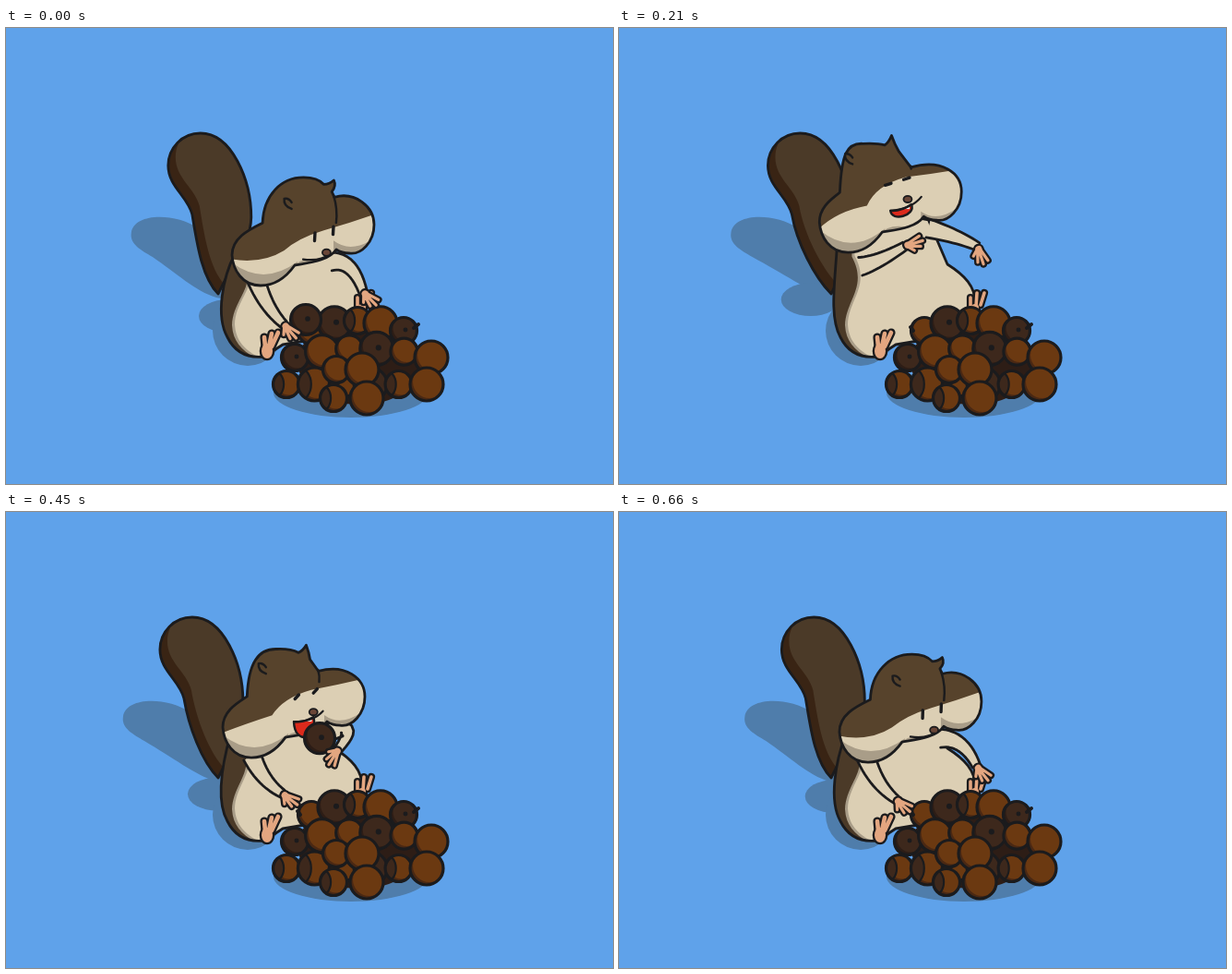
Write an HTML page with a canvas that moves like this. It is 658x494 px and loops after 0.69 s.

```html
<!DOCTYPE html>
<html lang="en">
<head>
<meta charset="utf-8">
<title>Hungry squirrel</title>
<style>
html, body { margin: 0; width: 100%; height: 100%; overflow: hidden; background: #5fa2ea; }
canvas { display: block; }
</style>
</head>
<body>
<canvas id="stage" width="658" height="494"></canvas>
<script>
const g = document.getElementById('stage').getContext('2d');
const LOOP = 690, STEP = 30;
const SKY = '#5fa2ea', SHADOW = '#4f7dab', INK = '#1b1b1d', FUR = '#4b3a28', FUR_DARK = '#392414',
  HEAD_FUR = '#57432c', CREAM = '#dccfb4', CREAM_DARK = '#a99d88', SKIN = '#e3a680', RED = '#dc2a1c',
  NUT = '#6b3911', NUT_DARK = '#4a2813', CAP = '#3d281c', CAP_DARK = '#2d1d16';

// each bite: bend down, throw the head back, bend down again
const BITES = [
  { from: 0, top: 190, to: 380, pick: [325, 316], eat: [316, 216] },
  { from: 380, top: 537, to: LOOP, pick: [380, 298], eat: [318, 216] }
];

// rows of the pile: y, first x, last x, drop at the ends, kinds (nut, cap, side)
const ROWS = [
  [317, 331, 431, 11, 'ncsnc'], [347, 313, 461, 10, 'cnncnn'], [386, 304, 456, 0, 'ssncsn'],
  [370, 358, 386, 0, 'nn'], [401, 355, 391, 0, 'sn']
];

const mix = (a, b, k) => a + (b - a) * k;
const rad = a => a * Math.PI / 180;

function biteAt(time) {
  const t = time % LOOP, bite = BITES[t < BITES[0].to ? 0 : 1], { from, top, to } = bite;
  const up = (t - from) / (top - from), down = (t - top) / (to - top);
  return t < top
    ? { bite, up, lean: up ** 1.4, reach: Math.sin(up * Math.PI / 2), open: Math.min(1, up * 1.25) }
    : { bite, up: 1, lean: 1 - down, reach: Math.max(0, 1 - 2 * down), open: .3 * (1 - down) };
}

function ball(x, y, rx, ry = rx) {
  const path = new Path2D();
  path.ellipse(x, y, rx, ry, 0, 0, 7);
  return path;
}

function poly(points) {
  const path = new Path2D();
  points.forEach(p => path.lineTo(...p));
  return path;
}

function fill(path, color) {
  g.fillStyle = color;
  g.fill(path);
}

function ink(path, width = 2.8, color = INK) {
  g.lineWidth = width;
  g.strokeStyle = color;
  g.stroke(path);
}

function inside(path, draw) {
  g.save();
  g.clip(path);
  draw();
  g.restore();
}

function acorn(x, y, r, kind) {
  const rim = ball(x, y, r), cap = kind === 'c';
  fill(rim, cap ? CAP_DARK : NUT_DARK);
  inside(rim, () => {
    fill(ball(x + 3, y - 3, r), cap ? CAP : NUT);
    if (kind !== 's') return;
    const shell = ball(x - r * .95, y, r * .75, r);
    fill(shell, CAP);
    ink(shell, 2.2);
  });
  ink(rim, 3.2);
  if (cap) fill(ball(x + 2, y - 1, r * .17), INK);
}

function drawPile() {
  fill(ball(384, 362, 68, 46), CAP_DARK);
  for (const [y, x0, x1, drop, kinds] of ROWS) {
    [...kinds].forEach((kind, i) => {
      const u = i / (kinds.length - 1);
      acorn(mix(x0, x1, u), y + drop * (2 * u - 1) ** 2, i % 2 ? 18 : 14.5, kind);
    });
  }
  ink(new Path2D('M442 325L447 321M316 324L319 328'), 4);
}

// strokes with a shared outline, closed off by a round pad
function paw(strokes, width, pad) {
  const path = new Path2D(strokes);
  ink(path, width + 4.6);
  ink(pad, 4.6);
  fill(pad, SKIN);
  ink(path, width, SKIN);
}

function hand(x, y, angle) {
  g.save();
  g.translate(x, y);
  g.rotate(rad(angle));
  paw('M2 -1L18 -5M2 0L20 1M2 1L16 6M2 1L8 8', 3.2, ball(3, 0, 3.6));
  g.restore();
}

function limb(a, b, c) {
  const one = [], two = [];
  for (let i = 0; i <= 12; i++) {
    const u = i / 12, v = 1 - u, w = mix(10, 4.5, u);
    const pos = k => v * v * a[k] + 2 * u * v * b[k] + u * u * c[k];
    const dir = k => v * (b[k] - a[k]) + u * (c[k] - b[k]);
    const len = Math.hypot(dir(0), dir(1)), nx = -dir(1) / len * w, ny = dir(0) / len * w;
    one.push([pos(0) + nx, pos(1) + ny]);
    two.unshift([pos(0) - nx, pos(1) - ny]);
  }
  fill(poly([...one, ...two]), CREAM);
  ink(poly(one));
  ink(poly(two));
}

function drawShadows(hx, hy, s) {
  fill(new Path2D(`M${137 + s} 222C${140 + s} 200 ${184 + s} 200 ${210 + s} 217C${232 + s / 2} 235 245 260 245 295
    L228 292C205 285 ${186 + s / 2} 266 ${160 + s} 248C${148 + s} 241 ${135 + s} 234 ${137 + s} 222Z`), SHADOW);
  fill(ball(241 + hx * 1.2, 312 + hy * .5, 32, 18), SHADOW);
  fill(ball(262, 328, 38, 38), SHADOW);
  fill(ball(374, 395, 84, 27), SHADOW);
}

function drawTail(s) {
  const path = new Path2D(`M230 288C212 270 ${208 + s} 232 ${203 + s} 202C${198 + s} 182 ${177 + s} 172 ${177 + s} 149
    C${177 + s} 130 ${192 + s} 114 ${212 + s} 114C${246 + s} 114 ${267 + s} 165 ${267 + s} 205
    C${266 + s / 2} 225 255 245 243 262Z`);
  fill(path, FUR_DARK);
  inside(path, () => {
    g.translate(8, -9);
    fill(path, FUR);
  });
  ink(path);
}

function drawBody(hx, hy) {
  const x = 248 + hx * .4, y = 245 + hy * .5;
  const path = new Path2D(`M${x} ${y}C235 270 227 312 240 335C248 351 262 358 280 356L300 343L330 338
    L380 322L386 297C386 280 375 268 356 256L${352 + hx * .6} ${240 + hy * .9}L${290 + hx} ${230 + hy}Z`);
  fill(path, FUR);
  inside(path, () => {
    const bx = 258 + hx * .2, by = 262 + hy * .4;
    const belly = new Path2D(`M${bx} ${by}C270 280 246 295 245 322C246 340 256 350 272 358L400 360V180H${bx}Z`);
    fill(belly, CREAM_DARK);
    g.translate(3, -1);
    fill(belly, CREAM);
  });
  ink(path);
  paw('M381 303L381 292M387 302L388 287M392 300L396 287', 3.6, ball(386, 303, 4));
  paw('M281 345L280 335M285 345L288 331M288 345L295 330', 4.6, ball(283, 350, 6, 8));
}

function drawMouth(q, open) {
  const l = [322, 252 - 20 * q], r = [350 + 6 * q, 247 - 31 * q];
  const p = [mix(l[0], r[0], .68), mix(l[1], r[1], .45)], depth = open * 46;
  if (open > .07) {
    const gap = new Path2D(`M${l}Q${mix(l[0], p[0], .5)} ${l[1] + 1} ${p}
      C${p[0] + 5} ${p[1] + depth} ${l[0] + 1} ${l[1] + depth} ${l}Z`);
    fill(gap, RED);
    inside(gap, () => {
      g.fillStyle = '#f4f1ea';
      g.fillRect(p[0] - 8, p[1] - 3, 6, 8);
    });
    ink(gap, 2.4);
  }
  ink(new Path2D(`M${l}Q${p[0]} ${p[1] + 5} ${r}`), 2.2);
}

// the cheeks keep their shape; skull, fur edge and face shift with the nod q
function drawHead(hx, hy, q, open) {
  const at = (x, y, dx, dy) => [x + dx * q, y + dy * q];
  g.save();
  g.translate(hx, hy);
  const path = new Path2D(`M${at(279, 211, -13, 3)}
    C${at(280, 182, -12, -10)} ${at(300, 162, -28, -2)} ${at(325, 162, -36, -1)}
    Q${at(340, 162, -36, -2)} ${at(347, 170, -34, -8)} Q${at(353, 170, -36, -11)} ${at(358, 166, -38, -15)}
    Q${at(361, 172, -38, -12)} ${at(355, 178, -26, -9)} L${at(357, 183, -14, 4)}
    C378 177 399 193 399 213C399 232 385 246 372 244Q364 244 358 240C350 252 330 254 313 257
    C303 271 290 279 276 279C256 279 246 262 245 246C245 228 262 219 ${at(279, 211, -13, 3)}Z`);
  fill(path, CREAM);
  inside(path, () => {
    fill(new Path2D(`M242 252Q278 ${281 + 4 * q} 316 253V290H240Z`), CREAM_DARK);
    fill(new Path2D(`M355 ${230 + 5 * q}Q372 ${243 + 4 * q} 394 231V252H355Z`), CREAM_DARK);
    fill(new Path2D('M310 260Q320 247 342 252V270H310Z'), CREAM_DARK);
    fill(new Path2D(`M${at(243, 250, 1, 4)}Q${at(278, 258, -15, -26)} ${at(302, 242, -6, -15)}
      Q${at(318, 229, -13, -25)} ${at(345, 221, -7, -26)}Q${at(375, 212, -8, -20)} ${at(402, 202, -8, -14)}
      L430 100H200V254Z`), HEAD_FUR);
  });
  ink(path);

  const [ex, ey] = at(308, 191, -34, -15);
  const ear = new Path2D(`M${ex + 4} ${ey + 6}Q${ex - 5} ${ey + 3} ${ex - 4} ${ey - 5}Q${ex + 1} ${ey - 6} ${ex + 4} ${ey - 1}`);
  fill(ear, HEAD_FUR);
  ink(ear, 2.4);
  const fold = Math.max(0, 1 - q);
  ink(new Path2D(`M${at(356, 181, -13, 5)}q${5 * fold} ${16 * fold} ${3 * fold} ${32 * fold}`), 2.4);

  const tall = 4.5 * fold, flat = 3.5 * q;
  for (const [x, y] of [at(336, 228, -18, -25), at(356, 221, -18, -24)]) {
    ink(new Path2D(`M${x - flat} ${y + tall + flat * .2}L${x + flat} ${y - tall - flat * .2}`), 3.4);
  }
  drawMouth(q, open);
  const nose = ball(...at(348, 245, -8, -26), 4.5, 3.6);
  fill(nose, '#6a4637');
  ink(nose, 1.8);
  g.restore();
}

function draw(t) {
  const { bite, up, lean, reach, open } = biteAt(t);
  const nod = 1.2 * biteAt(t + 25).lean, sway = -17 * nod;
  const hx = -31 * lean, hy = -40 * lean;
  const grabL = bite === BITES[0] ? reach : 0, grabR = reach - grabL;
  const left = [301 - 4 * lean + 16 * grabL, 321 - 49 * lean - 52 * grabL];
  const right = [387 + 2 * lean - 42 * grabR, 286 - 55 * lean - 18 * grabR];
  const elbow = [376 - 11 * lean + 20 * grabR, 250 - 28 * lean - 26 * grabR];
  const shoulderL = [270 + hx * .3, 269 + hy * .3], shoulderR = [352 + hx * .6, 253 + hy];

  g.lineCap = g.lineJoin = 'round';
  g.fillStyle = SKY;
  g.fillRect(0, 0, 658, 494);
  drawShadows(hx, hy, sway);
  drawTail(sway);
  drawBody(hx, hy);
  drawPile();
  limb(shoulderL, [mix(shoulderL[0], left[0], .5) - 5, mix(shoulderL[1], left[1], .5) + 7], left);
  limb(shoulderR, elbow, right);
  drawHead(hx, hy, nod, open);
  if (up < .93) {
    const [x, y] = bite.pick.map((v, i) => mix(v, bite.eat[i], reach));
    acorn(x, y, 16.5, 'c');
  }
  hand(...left, 45 - 35 * lean - 42 * grabL);
  hand(...right, 42 + 30 * lean + 105 * grabR);
}

const start = performance.now();
function tick() {
  const t = (performance.now() - start) % LOOP;
  draw(Math.floor(t / STEP) * STEP);
  requestAnimationFrame(tick);
}
tick();
</script>
</body>
</html>
```
